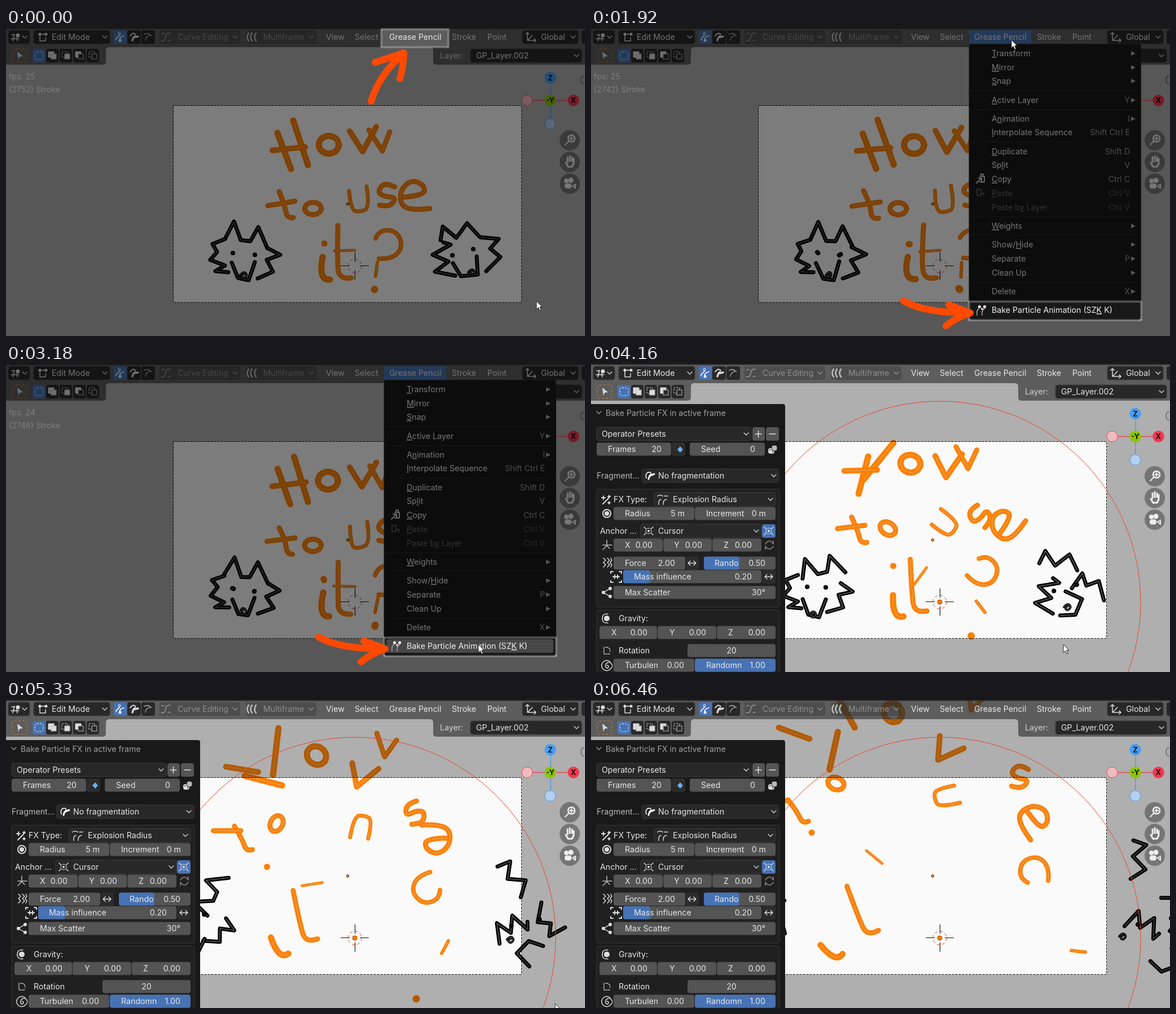
Recreate the animation shown at these times as an HTML page. Size 1026 by 546 pixels, loop 6.49 s.

```html
<!DOCTYPE html>
<html lang="en">
<head>
<meta charset="utf-8">
<title>Particle baking demo</title>
<style>
html, body { margin: 0; width: 100%; height: 100%; overflow: hidden; background: #b2b2b2; }
svg { display: block; width: 100%; height: 100%; font: 14.2px Inter, "Noto Sans", sans-serif; }
text { white-space: pre; }
tspan { text-decoration: underline; }
.glow { fill: none; stroke: #fff; stroke-width: 2; opacity: .5; filter: blur(1px); }
.arrow { fill: none; stroke: #ff4a00; stroke-width: 12; stroke-linecap: round; stroke-linejoin: round; }
</style>
</head>
<body>
<svg id="stage" viewBox="0 0 1026 546"></svg>
<script>
const LOOP = 6490, FRAME = 1000 / 24;
const MENU_AT = 1500, BAKE_AT = 4000;
const BLUE = '#4772b3', FIELD = '#545454', DROP = '#282828';

// ---------- drawing helpers ----------
const text = (x, y, s, fill = '#e8e8e8', anchor = 'start') =>
  `<text x="${x}" y="${y + 5}" fill="${fill}" text-anchor="${anchor}">${s}</text>`;
const box = (x1, x2, y, fill, h = 24, extra = '') =>
  `<rect x="${x1}" y="${y - h / 2}" width="${x2 - x1}" height="${h}" rx="4" fill="${fill}" ${extra}/>`;
const line = (d, color = '#ddd', w = 1.5, extra = '') =>
  `<path d="${d}" fill="none" stroke="${color}" stroke-width="${w}" stroke-linecap="round" stroke-linejoin="round" ${extra}/>`;
const dot = (x, y, r, fill, stroke = 'none', extra = '') =>
  `<circle cx="${x}" cy="${y}" r="${r}" fill="${fill}" stroke="${stroke}" ${extra}/>`;
const chevron = (x, y, c = '#ccc') => line(`M${x - 4} ${y - 2}l4 4 4-4`, c);
const drop = (x1, x2, y, label, lx, dim) =>
  box(x1, x2, y, dim ? 'rgba(40,40,40,.3)' : DROP, 24, dim ? '' : 'stroke="#3d3d3d"') +
  text(lx, y, label, dim ? '#8f8f8f' : '#e8e8e8') + chevron(x2 - 9, y, dim ? '#8f8f8f' : '#ccc');
const field = (x1, x2, y, label, lx, value, vx, fill = 0) =>
  box(x1, x2, y, FIELD, 23) + (fill ? box(x1, x1 + fill, y, BLUE, 23) : '') +
  text(lx, y, label) + text(vx, y, value, '#e8e8e8', 'end');
const pen = (x, y, c = '#fff') =>
  line(`M${x - 7} ${y + 4}c-2-6 1-11 6-10s1 5-1 6`, c, 1.6) + line(`M${x - 3} ${y + 6}q1-6 5-7l5-2`, c, 3);
const swap = (x, y) => line(`M${x - 7} ${y}h14m-4-4l4 4-4 4M${x - 3} ${y - 4}l-4 4 4 4`, '#ddd', 1.4);

// ---------- hand-drawn strokes: width, smooth, points, travel x, travel y, turn ----------
const ring = (cx, cy, rx, ry) => Array.from({ length: 17 }, (_, i) =>
  `${cx + rx * Math.cos(i * Math.PI / 8)},${cy + ry * Math.sin(i * Math.PI / 8)}`).join(' ');
const ORANGE = [
  [11, 0, '481,186 505,250', -63, -128, 213],
  [11, 0, '509,164 535,243', -75, -191, 349],
  [10, 0, '472,217 530,211', -141, -155, 26],
  [11, 1, ring(572, 207, 18, 16), -37, -185, 60],
  [10, 0, '609,183 632,219 656,175', -4, -108, 37],
  [9, 0, '643,181 667,218 680,184', 15, -201, 25],
  [9, 1, '484,290 494,314 498,338 509,336', -129, -117, -15],
  [9, 0, '464,315 512,307', -164, -135, 16],
  [9, 1, ring(544, 320, 15, 11), -110, -172, 200],
  [7, 1, '608,289 611,323 627,326 645,319 639,281', 4, -132, -275],
  [9, 1, '689,282 672,273 658,290 670,299 692,300 680,318 662,314', 85, -160, -355],
  [9, 1, '703,300 742,297 741,278 718,269 698,288 700,316 725,323 751,320', 62, -83, -300],
  [11, 0, '564,382 564.1,382', -173, -147, 0],
  [11, 1, '561,406 553,448 574,446', -139, 19, -50],
  [9, 1, '588,350 587,410 590,446 612,443', -118, -27, -21],
  [5, 0, '582,395 618,394', -98, -116, -319],
  [8, 1, '655,373 661,358 692,359 704,388 684,410 661,409', 107, -84, 274],
  [6, 0, '658,415 655,440', 207, 18, -270],
  [13, 0, '653,463.5 653.1,463.5', 126, 113, 0],
];
const BLACK = [
  [7, 0, '388,374 404,343 416,376 433,378 447,353 463,390', -110, -38, -124],
  [7, 0, '388,374 366,383 374,397 362,411 388,421 371,431 394,433', -130, 0, 0],
  [7, 0, '463,390 486,402 462,411 473,432 446,444', -147, -8, 48],
  [7, 0, '400,416 411,443 430,447 441,415', -155, 10, 12],
  [8, 0, '402,399 402.1,399', -115, -25, 0],
  [8, 0, '441,402 441.1,402', -153, -37, 0],
  [4, 1, '415,438 421,431 428,438 421,445 416,439 422,436', -170, 35, 0],
  [7, 0, '770,376 774,352 798,372 817,346 838,369', 166, -76, 100],
  [7, 0, '775,380 788,384 756,402 784,414 760,432 796,439', 205, -10, 122],
  [7, 0, '841,371 873,374 858,391 876,406 851,431', 172, -22, -365],
  [7, 0, '792,417 806,440 836,437 834,405', 200, 40, -375],
  [8, 0, '791,403 791.1,403', 178, -5, 0],
  [8, 0, '828,392 828.1,392', 200, -5, 0],
  [4, 1, '819,433 825,426 832,433 825,440 820,434 826,431', 117, -14, 0],
];
const strokes = [...ORANGE.map(s => ['#ff8000', '#e0aa70', s]), ...BLACK.map(s => ['#000', '#808080', s])]
  .map(([color, core, [width, smooth, pts, dx, dy, turn]]) => {
    const points = pts.split(' ').map(p => p.split(',').map(Number));
    const mid = a => (Math.min(...points.map(p => p[a])) + Math.max(...points.map(p => p[a]))) / 2;
    return { color, core, width, smooth, points, dx, dy, turn, cx: mid(0), cy: mid(1) };
  });

function pathOf(points, smooth) {
  if (!smooth) return 'M' + points.join('L');
  const last = points.length - 1;
  let d = 'M' + points[0];
  for (let i = 1; i < last; i++) {
    const [a, b] = [points[i], points[i + 1]];
    d += `Q${a} ${i === last - 1 ? b : [(a[0] + b[0]) / 2, (a[1] + b[1]) / 2]}`;
  }
  return d;
}
const inkMarkup = strokes.map(s => `<g class="ink">${line('', s.color, s.width)}${line('', s.core, 1)}</g>`).join('');

// ---------- viewport ----------
const scene = `
  <rect width="1026" height="546" fill="#fafafa"/>${inkMarkup}
  <path d="M0 0H1026V546H0ZM297 138V487H914V138Z" fill-rule="evenodd" opacity=".3"/>
  <rect x="296.500" y="137.500" width="617" height="349" fill="none" stroke="#111" stroke-dasharray="4 2"/>
  <g id="radius">${dot(618, 422, 356, 'none', '#e8452c')}${dot(618, 422, 4, '#ff8000', '#a04000')}</g>
  ${dot(605.5, 312, 2.3, '#ee8420', '#603000')}
  ${dot(618, 422, 12, 'none', '#e33', 'stroke-dasharray="5 4.4"')}
  ${line('M593.500 421.500h15m19 0h15M618.500 398v16m0 16v16', '#111', 1.1)}
  <text id="fps" x="5" y="91" fill="#fff"></text><text id="count" x="5" y="114" fill="#fff"></text>`;

const gizmo = line('M965 98v21m0 18v24', '#4a9de8') + line('M933 128.500h22m20 0h20', '#e8485c') +
  dot(923.5, 128.5, 9.5, '#f0bcc0', '#f2425a') + dot(964.5, 170, 9.5, '#b4d0ee', '#4a9de8') +
  [[964.5, 88, '#4a9df0', 'Z'], [964.5, 128.5, '#8bc400', '-Y'], [1005.5, 128.5, '#f0384f', 'X']]
    .map(([x, y, c, s]) => dot(x, y, 10.3, c) +
      `<text x="${x}" y="${y + 4.5}" text-anchor="middle" font-size="13" font-weight="600">${s}</text>`).join('') +
  [199, 237.5, 276].map(y => dot(999, y, 18, 'rgba(60,60,60,.5)')).join('') +
  dot(1002, 196, 6, 'none', '#eee', 'stroke-width="2.5"') + line('M997 201l-6 6M999 196h6m-3-3v6', '#eee', 2) +
  line('M992 239l4 7h7l3-6v-8m-11 6v-9m4 7v-9m4 9v-7', '#eee', 3) +
  box(990, 1002, 280, '#eee', 9) + dot(993, 271, 4, '#eee') + dot(1001, 270, 4.5, '#eee') + line('M1004 280l5-3v7z', '#eee', 2) +
  line('M1024 85q-5 0-5 7t5 7', '#777', 2);

const HEAD = 'rgba(48,48,48,.64)';
const selectIcon = (x, i) => box(x - 11, x + 11, 49, DROP) +
  `<rect x="${x - 7}" y="42" width="10" height="10" fill="${i % 2 ? 'none' : '#ddd'}" stroke="#ddd" stroke-dasharray="${i % 2 ? '3 2' : ''}"/>
  <rect x="${x - 2}" y="46" width="9" height="9" fill="${i < 2 ? '#ddd' : DROP}" stroke="#bbb"/>`;
const header = `
  <path fill="${HEAD}" d="M0 0H1026V65H763Q757 65 757 59V40Q757 34 751 34H183Q177 34 177 40V59Q177 65 171 65H0Z"/>
  <rect width="1026" height="1.5" fill="#2a2a2a"/>
  ${drop(4, 42, 16, '', 0)}${line('M9 19h14M10 12h5M12 23l3-12m4 6l1 6')}${dot(21, 13, 3.5, '#ddd')}
  ${drop(49, 184, 16, 'Edit Mode', 81)}${line('M58 11h14M60 9v14m10-6v6h-10', '#ddd')}${dot(60, 11, 2.5, '#ddd')}${dot(71, 11, 2.5, '#ddd')}
  ${box(191, 214, 16, BLUE)}${box(215, 239, 16, DROP)}${box(240, 264, 16, DROP)}
  ${line('M195 21c0-6 5-3 6-9m1 11q-2-8 7-9', '#fff', 1.6)}${dot(201, 10, 2, 'none', '#fff')}${dot(202, 22, 2.5, '#fff')}
  ${line('M220 14q4-6 8-4t-2 5', '#ddd', 1.8)}${line('M224 22q1-6 5-6l5-1', '#ddd', 3.4)}
  ${line('M245 11q9-3 11 2m-9 9q1-9 11-9', '#999')}
  ${drop(272, 415, 16, 'Curve Editing', 304, 1)}${line('M275 23q8 0 8-7t8-7m-15 1h4m7 12h4', '#999')}
  ${drop(425, 550, 16, 'Multiframe', 456, 1)}${line('M430 9q-5 7 0 14m6-14q-5 7 0 14m7-14q-5 7 0 14', '#bbb', 2.6)}
  <g id="hover">${box(670, 780, 16, 'rgba(255,255,255,.13)')}</g><g id="opened">${box(670, 780, 16, BLUE)}</g>
  ${[[567, 'View'], [618, 'Select'], [679, 'Grease Pencil'], [790, 'Stroke'], [853, 'Point']].map(([x, s]) => text(x, 16, s)).join('')}
  ${drop(915, 1014, 16, 'Global', 948)}${line('M924 8v14h15M924 22l9-9m-12-2l3-3 3 3m9 8l3 3-3 3', '#ddd')}${box(1020, 1040, 16, DROP)}
  ${box(11, 37, 49, 'none', 24, 'stroke="#d57a2c" stroke-dasharray="4 3"')}<path d="M20 42l10 8-6 1-2 5z" fill="#ddd"/>
  ${box(47, 70, 49, BLUE)}${box(51, 66, 49, 'none', 14, 'stroke="#fff" stroke-dasharray="3 2"')}
  ${[82, 106, 130, 154].map(selectIcon).join('')}
  ${text(769, 49, 'Layer:', '#d0d0d0')}${drop(823, 1020, 49, 'GP_Layer.002', 833)}`;

// ---------- operator panel ----------
const group = (y, h) => `<rect x="10" y="${y}" width="324" height="${h}" rx="4" fill="#202020" stroke="#383838"/>`;
const axes = (y, cells) => cells.map(([x1, x2, lx, vx], i) => field(x1, x2, y, 'XYZ'[i], lx, '0.00', vx)).join('');
const target = (x, y) => line(`M${x - 8} ${y - 7}l3 3m10 8l3 3m0-14l-3 3m-10 8l-3 3`, '#ddd') + dot(x, y, 5, 'none', '#ddd') + dot(x, y, 2, '#ddd');
const panel = `
  <path d="M0 71H340Q344 71 344 75V546H0Z" fill="#191919"/>
  ${chevron(14, 86, '#999')}${text(26, 87, 'Bake Particle FX in active frame', '#a2a2a2')}
  ${drop(10, 284, 124, 'Operator Presets', 19)}${box(286, 308, 124, FIELD)}${box(310, 333, 124, FIELD)}${line('M291 124h11m-5.500-5.500v11M316 124h11')}
  ${field(10, 142, 151, 'Frames', 30, '20', 125)}${box(143, 167, 151, '#2c2c2c')}<path d="M158 146l5 5.500-5 5.500-5-5.500z" fill="#63b1ff"/>
  ${field(175, 308, 151, 'Seed', 195, '0', 291)}${box(314, 325, 154, '#ddd', 10)}${box(320, 330, 149, '#bbb', 10, 'stroke="#222"')}${dot(317, 152, 1, '#222')}${dot(322, 156, 1, '#222')}
  ${text(10, 198, 'Fragment...', '#bbb')}${drop(90, 333, 198, 'No fragmentation', 119)}${pen(105, 198)}
  ${group(222, 209)}
  ${line('M21 248l10-10m-9-4v6m-3-3h6m7-4v4m-2-2h4m-2 9v4m-2-2h4', '#ddd', 2)}${text(40, 240, 'FX Type:')}
  ${drop(112, 327, 240, 'Explosion Radius', 145)}${line('M120 249q-1-8 4-9m-6-6q4-3 9 0m1 15q-1-8 6-9m-4-6h6', '#ddd')}
  ${dot(28, 265, 7, 'none', '#ddd', 'stroke-width="2"')}${dot(28, 265, 4, '#ddd')}
  ${field(40, 183, 265, 'Radius', 60, '5 m', 166)}${field(184, 327, 265, 'Increment', 204, '0 m', 310)}
  ${text(16, 296, 'Anchor ...')}${drop(88, 302, 296, 'Cursor', 119)}${target(102, 296)}${box(303, 327, 296, BLUE)}${target(315, 296)}
  ${line('M28 312v10l-7 7m0-8h16m-9 1l5 5', '#bbb')}${axes(321, [[40, 127, 60, 109], [128, 214, 147, 197], [215, 302, 235, 285]])}
  ${line('M309 319q7-10 14 0v-6m0 10q-7 10-14 0v6', '#888')}
  ${line('M22 344l4 4-4 4 4 4-4 4m7-16l4 4-4 4 4 4-4 4m6-16l2 4-3 4 3 4-2 4', '#ddd')}
  ${field(40, 167, 353, 'Force', 60, '2.00', 149)}${box(168, 191, 353, '#2c2c2c')}${swap(179, 353)}${field(200, 327, 353, 'Rando', 219, '0.50', 309, 63)}
  ${line('M35 371v-3h4m11 0h4v3m0 13v3h-4m-11 0h-4v-3m4-7h11m-8-3v6m5-6v6', '#ddd', 2)}
  ${field(57, 302, 377, 'Mass influence', 76, '0.20', 285, 48)}${box(303, 327, 377, '#2c2c2c')}${swap(315, 377)}
  ${line('M22 405l10-6m-10 6l10 6', '#bbb')}${dot(22, 405, 3, '#ddd')}${dot(34, 398, 3, '#ddd')}${dot(34, 412, 3, '#ddd')}${field(40, 327, 405, 'Max Scatter', 60, '30°', 309)}
  ${group(436, 130)}
  ${dot(28, 451, 5, '#ddd')}${line('M30 443q-10-1-10 8t10 8', '#ddd')}${text(49, 451, 'Gravity:')}
  ${axes(476, [[15, 117, 36, 100], [118, 222, 139, 204], [223, 327, 243, 309]])}
  ${line('M23 502v12h12m-9-12q8 0 8 8', '#bbb', 1.5, 'stroke-dasharray="4 2"')}${text(49, 508, 'Rotation')}${box(171, 327, 508, FIELD, 23)}${text(249, 508, '20', '#e8e8e8', 'middle')}
  ${line('M28 534a2.500 2.500 0 1 1-2 3a6 6 0 1 1 9 3a9 9 0 1 1-1-12', '#ddd')}
  ${field(40, 183, 534, 'Turbulen', 60, '0.00', 165)}${field(184, 327, 534, 'Randomn', 204, '1.00', 309, 143)}`;

// ---------- drop-down menu: y, label with _ before the access key, shortcut, submenu, disabled ----------
const ITEMS = [
  [45, '_Transform', '', 1], [70, '_Mirror', '', 1], [94, '_Snap', '', 1], [128, '_Active Layer', 'Y', 1],
  [161, 'A_nimation', 'I', 1], [185, '_Interpolate Sequence', 'Shift Ctrl E'], [219, '_Duplicate', 'Shift D'],
  [243, 'Sp_lit', 'V'], [268, '_Copy', 'Ctrl C'], [293, '_Paste', 'Ctrl V', 0, 1], [318, 'Paste b_y Layer', 'Ctrl V', 0, 1],
  [351, '_Weights', '', 1], [384, 'Show/_Hide', '', 1], [409, 'Separate', 'P', 1], [434, 'Clean Up', '', 1],
  [467, 'Delete', 'X', 1], [500, 'Bake Particle Animation (SZ_K K)', ''],
];
const menu = `
  <rect x="670" y="28.500" width="304.500" height="489" rx="4" fill="#181818" stroke="#2c2c2c"/>
  <rect id="row" x="674" width="296" height="24" rx="4" fill="#484848"/>
  ${[111, 144, 202, 334, 367, 450, 483].map(y => line(`M671 ${y + .5}h302`, '#2b2b2b', 1)).join('')}
  ${ITEMS.map(([y, label, key, sub, off]) =>
    text(710, y, label.replace(/_(.)/, '<tspan>$1</tspan>'), off ? '#666' : '#f0f0f0') +
    text(955, y, key, off ? '#555' : '#999', 'end') +
    (sub ? `<path d="M957 ${y - 4}l8 4-8 4z" fill="#aaa"/>` : '')).join('')}
  ${line('M683 275l9-9m-6 0h6v6m-3-9h8v10h-8m2-11v-3h4v3', '#ccc', 2)}${line('M684 286h7v11h-7zm7 7h5v5', '#555', 2)}
  ${line('M684 509q-1-10 4-12m5 12q-1-10 5-12', '#aaa')}
  ${box(686, 691, 494, '#fff', 5)}${box(695, 700, 494, '#fff', 5)}${box(691, 695, 498, '#f5b9cc', 4)}`;

const spotlight = (id, x, y, w, h, shaft, head) => `<g id="${id}">
  <path d="M0 0H1026V546H0ZM${x} ${y}v${h}h${w}v${-h}Z" fill-rule="evenodd" opacity=".5"/>
  <rect class="glow" x="${x}" y="${y}" width="${w}" height="${h}"/>
  <path class="arrow" d="${shaft}${head}"/></g>`;

const stage = document.getElementById('stage');
stage.innerHTML = `${scene}${header}${gizmo}<g id="panel">${panel}</g><g id="menu">${menu}</g>
  ${spotlight('first', 665, 2, 119, 32, 'M647 130C657 98 676 70 703 47', 'M654 61Q682 52 705 44Q704 70 698 90')}
  ${spotlight('second', 670, 485, 305, 33, 'M554 484C582 500 625 505 668 505', 'M634 491L672 505Q646 514 629 528')}
  <path id="pointer" d="M0 0V14.500L3.400 11.400 5.800 17 8.200 16 5.800 10.500H10Z" fill="#fff" stroke="#222"/>`;

// ---------- animation ----------
const $ = id => document.getElementById(id);
const show = (id, on) => $(id).setAttribute('visibility', on ? 'visible' : 'hidden');
const inks = [...stage.querySelectorAll('.ink')];
const PATH = [
  [560, 940, 484], [1240, 745, 21], [1920, 745, 21], [1990, 748, 62],
  [2640, 830, 470], [2800, 837, 497], [4900, 837, 497], [5330, 973, 538], [5450, 1010, 562],
];

function pointerAt(t) {
  const i = PATH.findIndex(p => p[0] > t);
  if (i <= 0) return PATH[i ? PATH.length - 1 : 0].slice(1);
  const [a, b] = [PATH[i - 1], PATH[i]], u = (t - a[0]) / (b[0] - a[0]), e = u * u * (3 - 2 * u);
  return [a[1] + (b[1] - a[1]) * e, a[2] + (b[2] - a[2]) * e];
}

function drawInk(n, burst, blown) {
  strokes.forEach((s, i) => {
    // the line boil pauses once the strokes fly apart
    const wobble = k => blown ? 0 : 1.5 * Math.sin(n * (12.9 + k * 7.13));
    const points = s.points.map(([x, y], j) =>
      s.points.length > 12 ? [x + wobble(i), y + wobble(i + 5)] : [x + wobble(i + j * 3), y + wobble(i * 2 + j + .4)]);
    const d = pathOf(points, s.smooth);
    for (const p of inks[i].children) p.setAttribute('d', d);
    inks[i].setAttribute('transform',
      `translate(${s.dx * burst} ${s.dy * burst}) rotate(${s.turn * burst} ${s.cx} ${s.cy})`);
  });
}

function render(t) {
  const n = Math.floor(t / FRAME), blown = t >= BAKE_AT, menuOpen = t >= MENU_AT && !blown;
  const step = blown ? Math.floor((t - BAKE_AT + 10) / FRAME) % 20 : 0;
  drawInk(n, (step / 19) ** 1.16, blown);

  $('fps').textContent = `fps: ${n % 7 === 6 ? 24 : 25}`;
  $('count').textContent = `(${2742 + (10 + 6 * n) % 11}) Stroke`;

  const [x, y] = pointerAt(t);
  $('pointer').setAttribute('transform', `translate(${x} ${y})`);
  const row = ITEMS.find(item => Math.abs(item[0] - y) <= 12.5);
  show('row', menuOpen && row);
  if (row) $('row').setAttribute('y', row[0] - 12);

  show('hover', t < MENU_AT && y < 30);
  show('opened', menuOpen);
  show('menu', menuOpen);
  show('first', t < MENU_AT);
  show('second', menuOpen);
  show('panel', blown);
  show('radius', blown);
}

function tick() {
  render(performance.now() % LOOP);
  requestAnimationFrame(tick);
}
tick();
</script>
</body>
</html>
```
